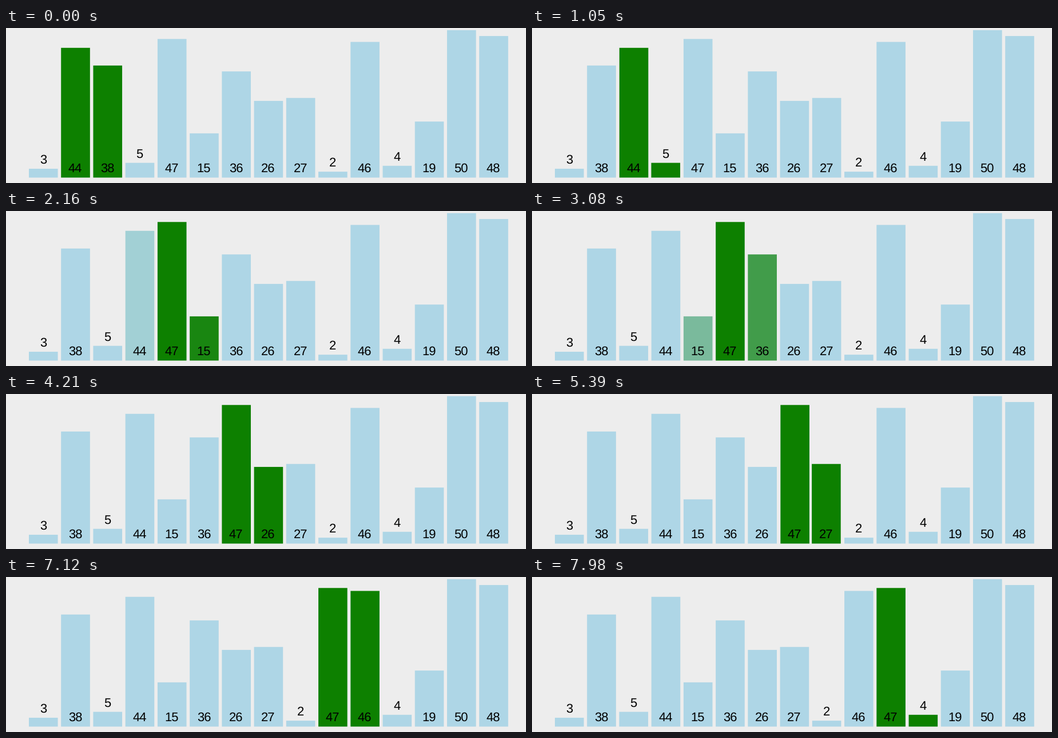
A matplotlib script that plays this animation: 909 px wide and 272 px high, repeating every 8000 ms.

```python
import numpy as np
import matplotlib.pyplot as plt
from matplotlib.animation import FuncAnimation
from matplotlib.patches import Rectangle

W, H, DPI = 909, 272, 64
LOOP, TICK = 8000, 20
FIRST, STEP, EASE_MS = 52, 481, 250   # ms: first move, spacing, duration
LEFT, PITCH, BAR_W, BASE, UNIT = 40, 56.23, 50.6, 262.5, 5.175
BLUE = np.array([174, 214, 230]) / 255
GREEN = np.array([13, 128, 0]) / 255
VALUES = [3, 44, 38, 5, 47, 15, 36, 26, 27, 2, 46, 4, 19, 50, 48]

plt.rcParams["text.hinting"] = "none"


def plan_moves():
    """One bubble sort pass as (start, bar, property, change) entries."""
    order = list(range(len(VALUES)))
    moves, start, slot = [], FIRST, 1
    while start < LOOP:
        a, b = order[slot], order[slot + 1]
        if VALUES[a] > VALUES[b]:
            moves += [(start, a, "slot", 1), (start, b, "slot", -1)]
            order[slot], order[slot + 1] = b, a
            start += STEP
        # Hand the highlight on to the next pair
        moves += [(start, order[slot], "glow", -1),
                  (start, order[slot + 2], "glow", 1)]
        start += STEP
        slot += 1
    return moves


MOVES = plan_moves()


def ease(t):
    t = min(max(t, 0), 1)
    return 4 * t**3 if t < 0.5 else 1 - 4 * (1 - t)**3


def state(ms):
    """Slot position and highlight of every bar at a given time."""
    props = {"slot": np.arange(len(VALUES), dtype=float),
             "glow": np.zeros(len(VALUES))}
    props["glow"][1:3] = 1
    for start, bar, name, change in MOVES:
        props[name][bar] += change * ease((ms - start) / EASE_MS)
    return props["slot"], props["glow"]


fig = plt.figure(figsize=(W / DPI, H / DPI), dpi=DPI, facecolor="#ededed")
ax = fig.add_axes([0, 0, 1, 1])
ax.set_xlim(0, W)
ax.set_ylim(H, 0)
ax.axis("off")

bars, labels = [], []
for value in VALUES:
    top = BASE - value * UNIT
    bar = Rectangle((0, top), BAR_W, BASE - top, lw=0, snap=False)
    bars.append(ax.add_patch(bar))
    baseline = top - 9 if value <= 5 else BASE - 9.5
    labels.append(ax.text(0, baseline, str(value), ha="center", va="baseline",
                          family="Liberation Sans", size=22 * 72 / DPI,
                          color="black"))


def draw(frame):
    slots, glows = state(frame * TICK)
    for bar, label, slot, glow in zip(bars, labels, slots, glows):
        x = LEFT + slot * PITCH
        bar.set_x(x)
        bar.set_facecolor(np.clip(BLUE + (GREEN - BLUE) * glow, 0, 1))
        label.set_x(x + BAR_W / 2 - 0.5)
    return bars + labels


anim = FuncAnimation(fig, draw, frames=LOOP // TICK, interval=TICK,
                     repeat=True, repeat_delay=0, blit=False)
plt.show()
```
